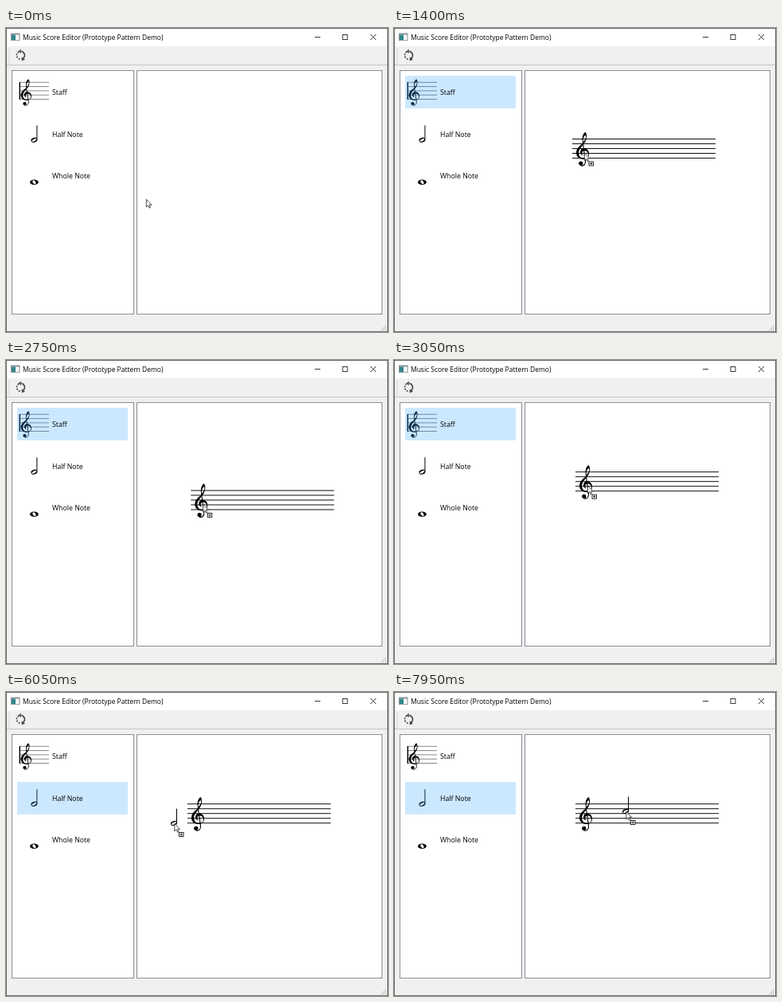
These frames come from a looping animation (480 by 382 pixels, 8 s). An HTML page with a canvas:

```html
<!DOCTYPE html>
<html lang="en">
<head>
<meta charset="utf-8">
<title>Music Score Editor</title>
<style>
html, body { margin: 0; width: 100%; height: 100%; overflow: hidden; background: #f0f0f0; }
canvas { display: block; width: 480px; height: 382px; }
</style>
</head>
<body>
<canvas id="stage" width="480" height="382"></canvas>
<script>
const ctx = document.getElementById('stage').getContext('2d');
const LOOP = 8000, TICK = 50;
const FONT = '"Open Sans", "Noto Sans", sans-serif';

// Times of the actions, in ms
const PRESS_STAFF = 750, DRAG_STAFF = 850, DROP_STAFF = 3750;
const PRESS_NOTE = 4850, DRAG_NOTE = 5250;

// Pointer path: time, x, y, easing into the stop
const PATH = [
  [100, 176, 215], [600, 61, 80.5, 's'], [800, 61, 80.5],
  [1400, 239, 156.5, 's'], [1550, 243, 159],
  [2000, 250.5, 187, 's'], [2250, 250, 196], [2500, 250, 196],
  [2750, 247.3, 181], [3050, 243, 157.7, 'o'],
  [4150, 243, 157.7], [4450, 104, 151, 's'], [4850, 64, 138, 'o'],
  [5200, 64, 138], [6050, 211.5, 165, 's'], [6100, 211.5, 165],
  [6950, 292.5, 154.5, 's'], [7250, 295.5, 156, 's'],
  [7650, 288.5, 150, 's'], [7900, 288.5, 150], [7950, 291.5, 150]
];
const EASE = { s: p => p * p * (3 - 2 * p), o: p => 1 - (1 - p) * (1 - p) };

const CLEF = new Path2D(
  'M8.4 14C6.6 8 8 2 11.4 0C13.6 2 14 8 10.5 13.5C8 17 4 20.5 3.2 25' +
  'C2.6 30 6 33.2 10 33.2C13.5 33.2 15 30.5 15 28C14.8 25 12.5 23.3 10 23.6' +
  'C7 24 6.5 27.5 8.8 29.5C5 28.8 4.2 25 5.8 22.5C8 19 16 20 16 27.3' +
  'C16 32 12.5 34.2 9 34.2C4 34.2 0 31 0 26C0 20 5 17 8.4 14Z' +
  'M9 12.2C8 9 9.5 5 11.6 4C13 6 11.5 10 9 12.2Z');
const CLEF_STEM = new Path2D('M8.2 13L11.5 36C12 41 9 43 5.6 42.2');
const ARROW = new Path2D('M.3 .3V9.9L2.5 7.9L4 11.2L5.5 10.5L4 7.3H7Z');

function pointerAt(t) {
  const i = PATH.findIndex(k => k[0] >= t);
  if (i < 0) return PATH[PATH.length - 1].slice(1, 3);
  if (i === 0) return PATH[0].slice(1, 3);
  const [t0, x0, y0] = PATH[i - 1], [t1, x1, y1, ease] = PATH[i];
  let p = (t - t0) / (t1 - t0);
  if (ease) p = EASE[ease](p);
  return [x0 + (x1 - x0) * p, y0 + (y1 - y0) * p];
}

function box(x, y, w, h, color) {
  ctx.fillStyle = color;
  ctx.fillRect(x, y, w, h);
}

function frame(x, y, w, h, color, width = 1) {
  ctx.strokeStyle = color;
  ctx.lineWidth = width;
  ctx.strokeRect(x, y, w, h);
}

function line(x0, y0, x1, y1, color, width = 1) {
  ctx.strokeStyle = color;
  ctx.lineWidth = width;
  ctx.beginPath();
  ctx.moveTo(x0, y0);
  ctx.lineTo(x1, y1);
  ctx.stroke();
}

function label(text, x, y, size) {
  ctx.font = size + 'px ' + FONT;
  ctx.fillStyle = '#000';
  ctx.fillText(text, x, y);
}

function clef(x, y, sx, sy, color) {
  ctx.save();
  ctx.translate(x, y);
  ctx.scale(sx, sy);
  ctx.fillStyle = ctx.strokeStyle = color;
  ctx.lineWidth = 1.1;
  ctx.fill(CLEF, 'evenodd');
  ctx.stroke(CLEF_STEM);
  ctx.beginPath();
  ctx.arc(5.8, 39.4, 2.6, 0, 7);
  ctx.fill();
  ctx.restore();
}

function staff(x, y) {
  for (let i = 0; i < 5; i++) line(x, y + i * 6, x + 180, y + i * 6, '#000', 0.95);
  clef(x + 5, y - 8.8, 1, 1, '#000');
}

function ring(x, y, outer, inner, color) {
  ctx.fillStyle = color;
  ctx.beginPath();
  ctx.ellipse(x, y, ...outer, 0, Math.PI * 2);
  ctx.closePath();
  ctx.moveTo(x, y);
  const hole = new Path2D();
  const rim = new Path2D();
  rim.ellipse(x, y, ...outer, 0, Math.PI * 2);
  hole.ellipse(x, y, ...inner, 0, Math.PI * 2);
  rim.addPath(hole);
  ctx.fill(rim, 'evenodd');
}

function halfNote(x, y, color) {
  ring(x, y, [4.1, 2.9, -0.35], [3.3, 1.3, -0.5], color);
  line(x + 3.5, y - 18.5, x + 3.5, y - 0.8, color, 1);
}

function staffIcon(color) {
  for (let i = 0; i < 5; i++) line(17, 68.3 + i * 5.3, 54, 68.3 + i * 5.3, color + '99', 0.8);
  line(17.3, 68, 17.3, 90, color, 1.4);
  clef(18.6, 64.2, 0.84, 0.78, color);
}

const ITEMS = [
  { name: 'Staff', top: 60, base: 84, icon: staffIcon },
  { name: 'Half Note', top: 113, base: 136.7, icon: c => halfNote(35.4, 140.8, c) },
  { name: 'Whole Note', top: 165.5, base: 189.3,
    icon: c => ring(35.4, 193.8, [5.4, 3.2, 0], [2.7, 1.7, 0.9], c) }
];

function list(selected, hovered) {
  ITEMS.forEach((item, i) => {
    const on = i === selected;
    if (on || i === hovered) box(14, item.top, 139, 41, on ? '#cce8ff' : '#e5f3ff');
    item.icon(on ? '#08263f' : '#000000');
    label(item.name, 58, item.base, 8.75);
  });
}

function reloadIcon() {
  const x = 18.5, y = 34.3, color = '#484848';
  ctx.strokeStyle = ctx.fillStyle = color;
  ctx.lineWidth = 1.7;
  ctx.beginPath();
  ctx.arc(x, y, 5, -1.4, 1.15);
  ctx.stroke();
  ctx.setLineDash([2, 1.4]);
  ctx.beginPath();
  ctx.arc(x, y, 5, 1.75, 4.6);
  ctx.stroke();
  ctx.setLineDash([]);
  ctx.fill(new Path2D('M18.8 26.6V32L15.6 29.3Z M19.7 36.4L24 39.8L19.7 41.2Z'));
}

function chrome() {
  box(0, 0, 480, 382, '#f0f0f0');
  box(0, 0, 480, 23, '#fff');

  // Title bar
  box(6, 6.5, 11.5, 9.5, '#8b9298');
  box(7, 8.5, 9.5, 6.7, '#f7f7f7');
  box(7, 8.5, 5, 6.7, '#32888b');
  label('Music Score Editor (Prototype Pattern Demo)', 21, 14.8, 8.48);
  line(388, 11.5, 395, 11.5, '#222', 0.9);
  frame(423, 8.5, 6, 6, '#222', 0.9);
  line(458, 8, 465, 15, '#222', 0.9);
  line(465, 8, 458, 15, '#222', 0.9);

  // Tool bar
  for (let y = 26; y < 44; y += 2.5) box(3.5, y, 1, 1, '#b4b4b4');
  reloadIcon();
  line(0, 46.5, 480, 46.5, '#c4c4c4');

  // Panels
  for (const [x, w] of [[7.5, 153], [164.5, 308]]) {
    box(x, 53.5, w, 306, '#fff');
    frame(x, 53.5, w, 306, '#8b8f96');
  }

  // Size grip
  for (let r = 0; r < 3; r++)
    for (let c = 0; c <= r; c++) box(476 - c * 2.3, 374 + r * 2.3, 1.3, 1.3, '#b0b0b0');

  frame(0.5, 0.5, 479, 381, '#6a6a6a');
}

function pointer(x, y, copying) {
  ctx.save();
  ctx.translate(x, y);
  ctx.fillStyle = '#fff';
  ctx.strokeStyle = '#111';
  ctx.lineWidth = 0.75;
  ctx.fill(ARROW);
  ctx.stroke(ARROW);
  if (copying) {
    box(6, 11.5, 5.5, 5, '#fff');
    frame(6, 11.5, 5.5, 5, '#111', 0.9);
    line(7.2, 14, 10.3, 14, '#111', 0.9);
    line(8.75, 12.5, 8.75, 15.5, '#111', 0.9);
  }
  ctx.restore();
}

function draw(t) {
  const [x, y] = pointerAt(t);
  const dragging = (t >= DRAG_STAFF && t < DROP_STAFF) || t >= DRAG_NOTE;
  const selected = t >= PRESS_NOTE ? 1 : t >= PRESS_STAFF ? 0 : -1;
  const hovered = dragging ? -1 : ITEMS.findIndex(
    item => x >= 14 && x < 153 && y >= item.top && y < item.top + 41);

  chrome();
  list(selected, hovered);
  if (t >= DRAG_STAFF) {
    const [sx, sy] = pointerAt(Math.min(t, DROP_STAFF));
    staff(sx - 15, sy - 17);
  }
  if (t >= DRAG_NOTE) halfNote(x - 0.5, y, '#000');
  pointer(x, y, dragging && x > 164);
}

const start = performance.now();
function tick() {
  const t = (performance.now() - start) % LOOP;
  draw(Math.floor(t / TICK) * TICK);
  requestAnimationFrame(tick);
}
tick();
</script>
</body>
</html>
```
